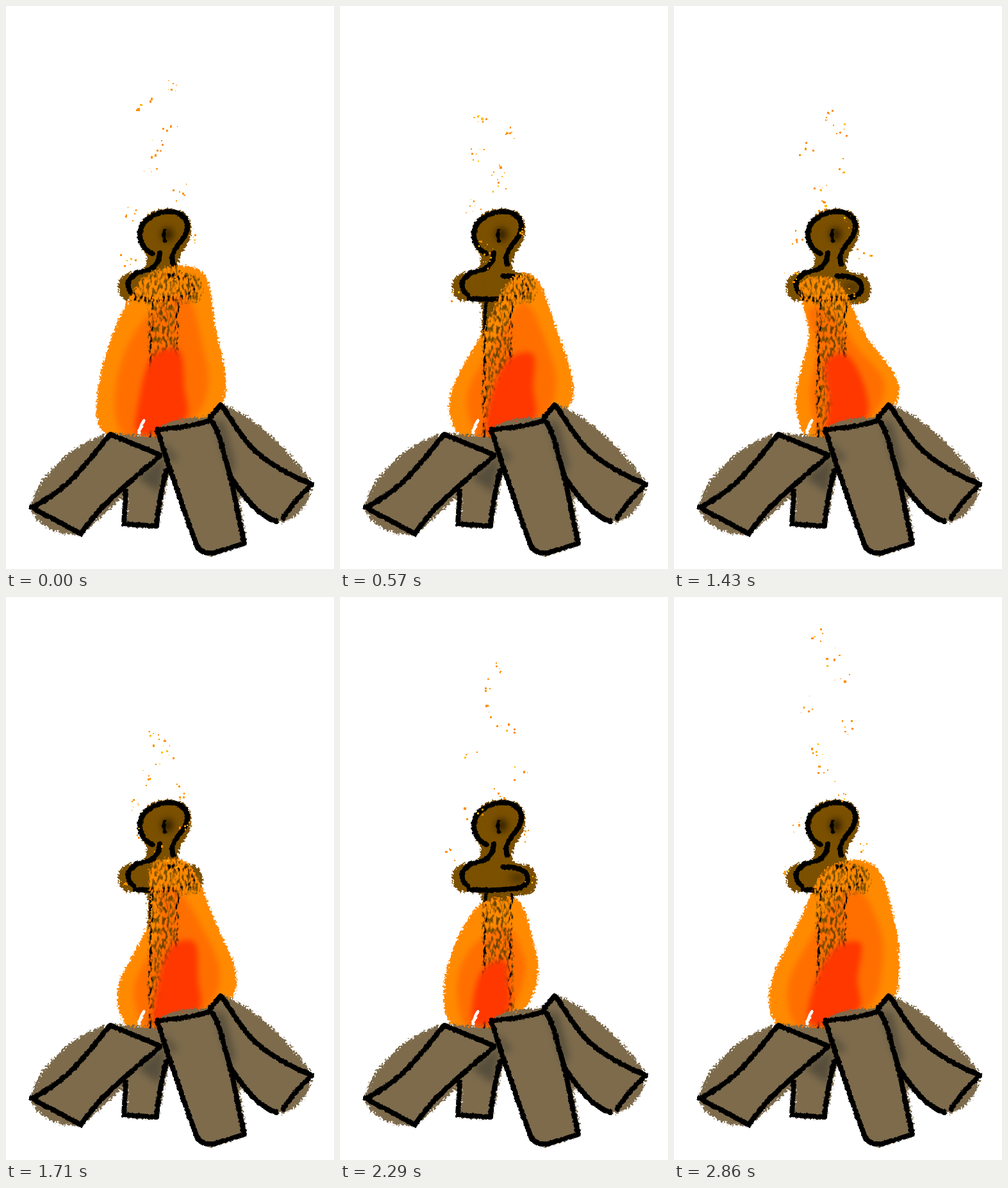
An HTML page for the animation above (3.01 s loop, 512 px wide and 878 px high).

```html
<!DOCTYPE html>
<html lang="en">
<head>
<meta charset="utf-8">
<title>Campfire</title>
<style>
  html, body { margin: 0; width: 100%; height: 100%; overflow: hidden; background: #fff; }
  svg { display: block; width: 100%; height: 100%; }
  .ink { fill: none; stroke: #000; stroke-width: 8; stroke-linecap: round; stroke-linejoin: round; filter: url(#wobble); }
  .thin { stroke-width: 5; }
</style>
</head>
<body>
<svg viewBox="0 0 512 878">
  <defs id="defs" color-interpolation-filters="sRGB">
    <filter id="wobble" filterUnits="userSpaceOnUse" x="0" y="0" width="512" height="878">
      <feTurbulence type="fractalNoise" baseFrequency=".2" numOctaves="2"/>
      <feDisplacementMap in="SourceGraphic" scale="4" xChannelSelector="R" yChannelSelector="A"/>
    </filter>
    <filter id="soft" filterUnits="userSpaceOnUse" x="0" y="0" width="512" height="878">
      <feGaussianBlur stdDeviation="4"/>
    </filter>
    <filter id="smudge" filterUnits="userSpaceOnUse" x="0" y="0" width="512" height="878">
      <feGaussianBlur stdDeviation="6"/>
    </filter>
    <filter id="dry" filterUnits="userSpaceOnUse" x="0" y="0" width="512" height="878">
      <feTurbulence type="fractalNoise" baseFrequency=".25 .12" numOctaves="2"/>
      <feComponentTransfer result="holes"><feFuncA type="linear" slope="4" intercept="-1.72"/></feComponentTransfer>
      <feComposite in="SourceGraphic" in2="holes" operator="in"/>
    </filter>
  </defs>

  <g id="stamp">
    <path filter="url(#brown)" d="M218 410L220 388C200 375 203 335 222 325C240 312 275 312 284 328C295 345 290 370 272 388L268 412L295 418C312 425 312 460 295 465L270 466L272 680L221 680L221 462L185 460C170 450 170 420 190 416Z"/>
    <g filter="url(#smudge)" fill="#2b1c00">
      <ellipse cx="252" cy="356" rx="9" ry="10"/>
      <ellipse cx="278" cy="438" rx="14" ry="6" opacity=".6"/>
      <path d="M240 465h14v210h-14z" opacity=".35"/>
    </g>
    <path class="ink" d="M228 386C205 375 203 345 222 332C240 318 268 316 280 332C292 352 268 370 261 385Q258 392 261 403M240 386C238 405 228 412 212 414C190 420 184 440 199 450M202 456C225 458 250 457 268 455C290 455 297 442 291 432Q282 420 255 421"/>
    <path class="ink thin" d="M248 349Q245 357 248 367M228 464Q225 480 227 520L224 672M268 464L266 520L265 672"/>
  </g>

  <path id="outer" filter="url(#orange)"/>
  <path id="mid" fill="#ff6f00" filter="url(#soft)"/>
  <use href="#stamp" filter="url(#dry)"/>
  <path id="core" fill="#ff3800" filter="url(#soft)"/>
  <path d="M216 645Q208 658 206 676" fill="none" stroke="#fff" stroke-width="5" filter="url(#wobble)"/>

  <g id="logs">
    <g filter="url(#wood)">
      <path d="M163 664L236 672L256 700L118 825C90 828 55 818 38 788C38 755 65 725 100 695Q130 674 163 664Z"/>
      <path d="M200 710L184 812L238 814L260 695Z"/>
      <path d="M237 660Q245 642 318 640C335 690 365 740 376 838L325 857Q305 859 298 845C280 790 255 720 237 660Z"/>
      <path d="M318 642L335 620C375 630 435 680 480 745Q470 797 428 807C395 802 370 765 345 735Z"/>
    </g>
    <g filter="url(#smudge)" fill="#3d3b31" opacity=".6">
      <path d="M205 735L250 700L240 760Z"/>
      <path d="M242 675L268 705L258 712Z"/>
      <path d="M324 645L340 650L357 715L350 735Z"/>
    </g>
    <path class="ink" d="M240 700L163 668C130 705 105 750 40 782L117 823C145 780 190 745 240 702M187 757L184 808L235 811Q238 775 250 724M236 660C255 720 275 780 298 842Q305 855 325 853L372 838C358 780 355 740 340 700Q334 665 318 643M243 660Q290 656 316 647M320 640L335 622C350 640 365 670 385 690C410 715 450 735 478 746Q455 765 433 798M348 730C365 755 390 795 422 803"/>
  </g>

  <path id="sparks" fill="#ff9000" shape-rendering="crispEdges"/>
  <path id="hotSparks" fill="#ffc000" shape-rendering="crispEdges"/>
</svg>
<script>
const LOOP = 3010, STEPS = 21;
const $ = id => document.getElementById(id);
const mix = (a, b, u) => a + (b - a) * u;

// A blurred silhouette plus noise, cut hard: a dry brush edge in one colour.
function addBrush(id, colour, blur, noise = .9, edge = 10) {
  $('defs').insertAdjacentHTML('beforeend', `
    <filter id="${id}" filterUnits="userSpaceOnUse" x="0" y="0" width="512" height="878">
      <feTurbulence type="fractalNoise" baseFrequency=".3" numOctaves="2" result="noise"/>
      <feGaussianBlur in="SourceGraphic" stdDeviation="${blur}" result="shape"/>
      <feComposite in="shape" in2="noise" operator="arithmetic" k2="${edge}" k3="${edge * noise}" k4="${-edge * (1 + noise) / 2}" result="mask"/>
      <feFlood flood-color="${colour}"/>
      <feComposite in2="mask" operator="in"/>
    </filter>`);
}
addBrush('brown', '#7b5000', 4);
addBrush('orange', '#ff8a00', 5);
addBrush('wood', '#7d6b4c', 6);

// Key poses by step: centre and half width of belly, waist and tip, tip height, height of the sparks.
const poses = {
  0:  [243, 101, 249, 79, 264, 42, 405, 83],
  4:  [268, 96, 281, 59, 285, 22, 416, 144],
  8:  [266, 86, 268, 54, 280, 26, 408, 194],
  10: [270, 80, 254, 44, 225, 30, 420, 149],
  13: [266, 98, 285, 55, 270, 30, 400, 215],
  14: [280, 115, 349, 46, 296, 44, 360, 141],
  15: [254, 91, 270, 55, 262, 32, 415, 141],
  16: [236, 74, 242, 59, 250, 28, 464, 96],
  20: [251, 101, 270, 75, 276, 37, 410, 49]
};
const keys = Object.keys(poses).map(Number);

function poseAt(step) {
  const from = keys.findLast(k => k <= step);
  const to = keys.find(k => k > step) ?? STEPS;
  return poses[from].map((v, i) => mix(v, poses[to % STEPS][i], (step - from) / (to - from)));
}

// Closed Catmull-Rom curve.
function smooth(points) {
  const at = i => points[(i + points.length) % points.length];
  let d = 'M' + points[0];
  points.forEach((b, i) => {
    const a = at(i - 1), c = at(i + 1), e = at(i + 2);
    d += 'C' + b.map((v, k) => v + (c[k] - a[k]) / 6) + ' ' + c.map((v, k) => v - (e[k] - b[k]) / 6) + ' ' + c;
  });
  return d + 'Z';
}

function flame([bellyX, bellyW, waistX, waistW, tipX, tipW, tipY], scale, drop) {
  const belly = bellyW * scale, waist = waistW * scale, tip = tipW * scale ** 2;
  const top = tipY + drop, waistY = mix(top, 600, .5);
  return smooth([
    [bellyX - belly + 12, 668], [bellyX - belly, 605], [waistX - waist, waistY], [tipX - tip, top + 12],
    [tipX + tip, top + 8], [waistX + waist, waistY], [bellyX + belly, 585], [bellyX + belly - 16, 635], [240, 690]
  ]);
}

function core([bellyX, bellyW, waistX, , , , tipY]) {
  const w = bellyW * .35, top = mix(540, 565, (tipY - 410) / 50);
  return smooth([
    [bellyX - w, 668], [bellyX - w, 615], [waistX - w * .6, top + 10],
    [waistX + w * .6, top], [bellyX + w, 595], [bellyX + w, 645]
  ]);
}

function randomFrom(seed) {
  return () => (seed = seed * 16807 % 2147483647) / 2147483647;
}

// Small clusters climb from the flame to the top and thin out sideways.
function drawSparks(step, top) {
  const clusters = 11, rises = 2;
  const random = randomFrom(7919 * (step + 3));
  const paths = ['', ''];
  for (let i = 0; i < clusters; i++) {
    const climb = (i / clusters + rises * step / STEPS) % 1;
    const x = 238 + Math.sin(i * 2.4 + climb * 3) * mix(70, 18, climb);
    const y = mix(460, top + 6, climb);
    for (let j = 3 + random() * 4; j > 0; j--) {
      const px = x + (random() + random() - 1) * 17;
      const py = Math.max(top, y + (random() + random() - 1) * 17);
      const size = 1 + random() * 2.5;
      paths[random() < .2 ? 1 : 0] += `M${px} ${py}h${size}v${size}h${-size}z`;
    }
  }
  $('sparks').setAttribute('d', paths[0]);
  $('hotSparks').setAttribute('d', paths[1]);
}

function draw(step) {
  const pose = poseAt(step);
  $('outer').setAttribute('d', flame(pose, 1, 0));
  $('mid').setAttribute('d', flame(pose, .72, 45));
  $('core').setAttribute('d', core(pose));
  document.querySelector('#orange feTurbulence').setAttribute('seed', step);
  drawSparks(step, pose.at(-1));
}

const startOf = step => Math.round(step * 100 / 7) * 10;
let shown = -1;
function tick() {
  const time = performance.now() % LOOP;
  let step = STEPS - 1;
  while (startOf(step) > time) step--;
  if (step !== shown) draw(shown = step);
  requestAnimationFrame(tick);
}
tick();
</script>
</body>
</html>
```
